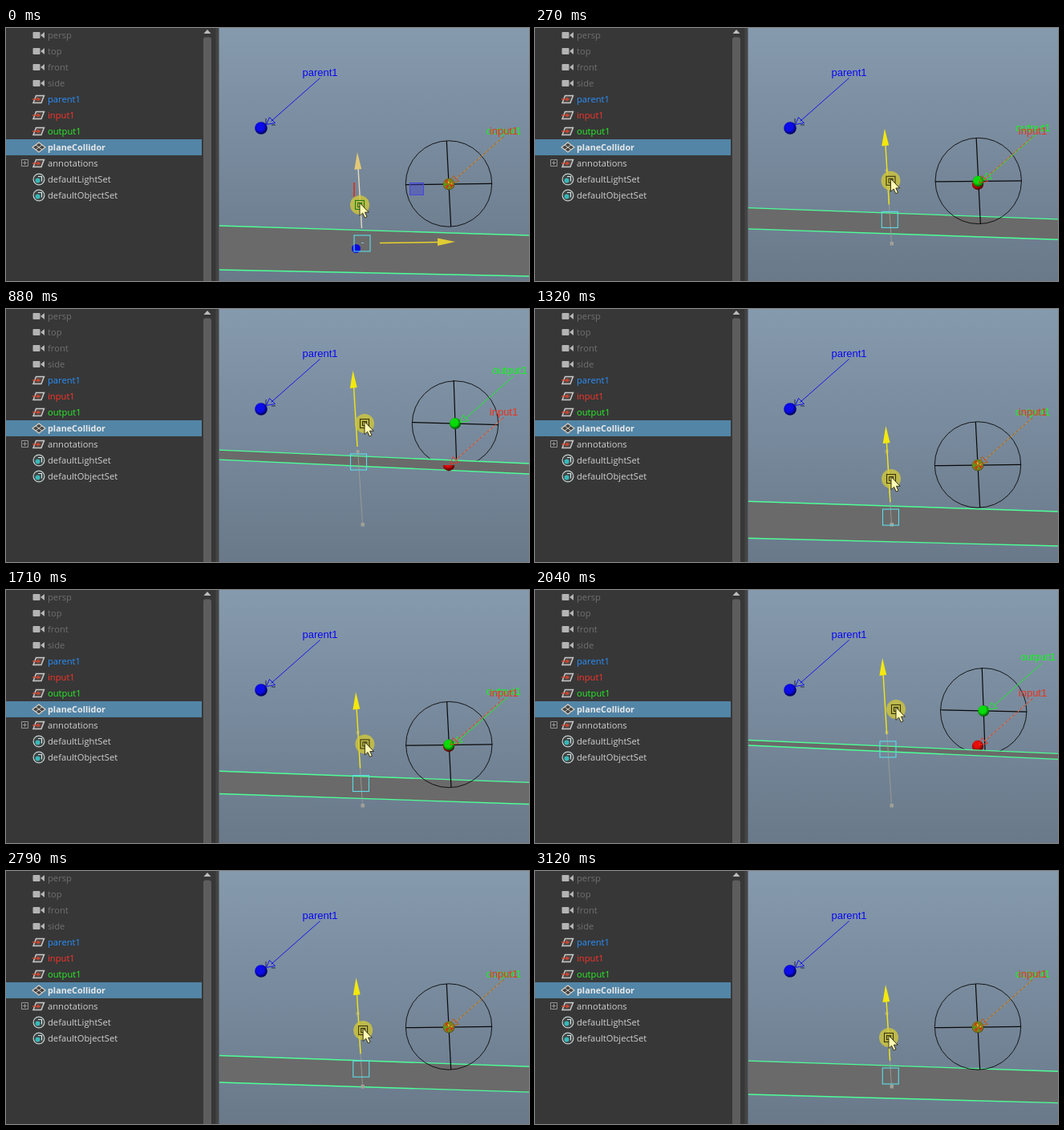
An HTML page that plays this animation: 652x316 px, repeating every 3160 ms.

```html
<!DOCTYPE html>
<html lang="en">
<head>
<meta charset="utf-8">
<title>Plane collider</title>
<style>
html, body { margin: 0; width: 100%; height: 100%; overflow: hidden; background: #373737; }
svg { display: block; }
.row { font: 11.2px "Open Sans", sans-serif; }
.row.selected { font-size: 10.8px; font-weight: 700; }
.tag { font: 13px "Liberation Sans", Arial, sans-serif; text-anchor: middle; }
</style>
</head>
<body>
<svg width="652" height="316" viewBox="0 0 652 316">
  <defs>
    <linearGradient id="sky" x1="0" y1="0" x2="0" y2="1">
      <stop offset="0" stop-color="#869aae"/><stop offset="1" stop-color="#69798a"/>
    </linearGradient>
    <radialGradient id="blue" cx=".42" cy=".4" r=".62">
      <stop offset=".5" stop-color="#0a0aea"/><stop offset="1" stop-color="#000048"/>
    </radialGradient>
    <radialGradient id="red" cx=".42" cy=".35" r=".65">
      <stop offset=".4" stop-color="#e80c0c"/><stop offset="1" stop-color="#4a0000"/>
    </radialGradient>
    <radialGradient id="green" cx=".42" cy=".4" r=".62">
      <stop offset=".5" stop-color="#08dc08"/><stop offset="1" stop-color="#004800"/>
    </radialGradient>
    <clipPath id="under"><rect id="underRect" x="530" width="44" height="40"/></clipPath>
    <clipPath id="view"><rect x="266" width="386" height="316"/></clipPath>
  </defs>
  <rect x="265" width="387" height="316" fill="url(#sky)"/>

  <g id="scene" clip-path="url(#view)">
    <g id="rig" fill="none" stroke="#080808">
      <circle id="ring" r="53.700" stroke-width=".9"/>
      <path id="cross" stroke-width="1.2"/>
      <circle id="inputBall" cx="552" cy="195" r="7.2" fill="url(#red)" stroke="none"/>
    </g>
    <g id="plane">
      <polygon id="face" fill="#6a6a6a"/>
      <path id="edges" fill="none" stroke="#4dff98" stroke-width="1.4"/>
    </g>
    <circle id="inputUnder" cx="552" cy="195" r="7.2" fill="url(#red)" clip-path="url(#under)"/>
    <circle id="outputBall" r="7" fill="url(#green)"/>
    <g id="mixed" transform="translate(552 195)">
      <circle r="6.8" fill="#8e7a18"/>
      <path d="M-5-4L-1-6V-1ZM1 0L6 1L3 5ZM-4 2L0 1L-2 6Z" fill="#c83414"/>
      <path d="M-6-1L-2 0L-5 3ZM1-6L5-3L1-1ZM0 2L3 3L0 6Z" fill="#3ca420"/>
      <path d="M-2-4L1-3L0 0ZM2-2H5L3 1Z" fill="#d8c028"/>
    </g>

    <circle cx="318" cy="125" r="7.8" fill="url(#blue)"/>
    <path d="M324 113V120M331 121H336" stroke="#202850"/>
    <g id="parentNote"></g>
    <g id="outputNote"></g>
    <g id="inputNote"></g>

    <g id="hover">
      <path d="M434 193V211" stroke="#d03c28" stroke-width="2"/>
      <rect x="503.500" y="193.500" width="17" height="15" fill="#3c3cd8" fill-opacity=".4" stroke="#4648dc"/>
      <circle cx="436.500" cy="275.500" r="5.500" fill="#0808dc"/>
      <path d="M466 268.500L540 267.500" stroke="#e6d22c" stroke-width="1.5"/>
      <path d="M538 262.500L560 267L538 272Z" fill="#e2cc34"/>
      <path d="M443 268.500H446" stroke="#7cc8d8"/>
    </g>
    <g id="ghost" stroke="#a0a098" fill="#a0a098">
      <path d="M438.700 178L444.500 269" stroke-opacity=".8"/>
      <rect x="436.500" y="176" width="4" height="4" stroke="none"/>
      <rect x="442.500" y="267" width="4.500" height="4.500" stroke="none"/>
    </g>
    <path id="shaft" fill="none" stroke-width="1.4"/>
    <path id="head"/>
    <rect id="pivot" width="20" height="20" fill="none" stroke="#5edce8" stroke-width="1.1"/>
    <g id="pointer">
      <circle r="12" fill="#d2c838" fill-opacity=".78"/>
      <g id="grip" fill="none" stroke-width="1.1">
        <rect x="-5.500" y="-5.500" width="11" height="11"/><rect x="-2.500" y="-2.500" width="5" height="5"/>
      </g>
      <path transform="translate(0 -1)" d="M0-1.500V14.500L3.600 11.200L6.200 17L9 15.700L6.400 10.200H11.200Z" fill="#fffab4" stroke="#28240c" stroke-width=".9"/>
    </g>
  </g>

  <rect width="246" height="316" fill="#373737"/>
  <rect x="246" width="10.500" height="316" fill="#373737"/>
  <path d="M246.500 7L251 2L255.500 7Z" fill="#bcbcbc"/>
  <rect x="246" y="11.500" width="10" height="320" rx="3" fill="#5d5d5d"/>
  <rect x="256.500" width="5" height="316" fill="#373737"/>
  <rect x="261.500" width="4" height="316" fill="#444"/>
  <g id="outliner"></g>
</svg>
<script>
const LOOP = 3160;
const $ = id => document.getElementById(id);
const set = (id, attrs) => {
  for (const k in attrs) $(id).setAttribute(k, attrs[k]);
};
const show = (id, on) => set(id, { visibility: on ? 'visible' : 'hidden' });

// Sidebar
const icons = {
  camera: '<rect x="33.500" y="-4" width="9" height="8" rx="1" fill="#b4b4b4"/><path d="M43 0L48-4V4Z" fill="#b4b4b4"/>',
  node: '<path d="M37.500-4.500H47.500L44 4.500H34Z" fill="#4c4846" stroke="#c8c8c8" stroke-width="1.500"/>' +
        '<path d="M33 0H40" stroke="#d0452f" stroke-width="1.400"/><path d="M39-2.500L43.500 0L39 2.500Z" fill="#d0452f"/>',
  mesh: '<path d="M41-6L49 0L41 6L33 0Z" fill="#444" stroke="#d8d0c4" stroke-width="1.200"/><path d="M37-3L45 3M45-3L37 3" stroke="#d8d0c4"/>',
  set: '<circle cx="41" r="6.900" fill="#404444" stroke="#c8d0d0" stroke-width="1.200"/>' +
       '<circle cx="39.500" cy="1.500" r="3" fill="#38b8b8"/><path d="M40-3.500H44.500V2.500" fill="none" stroke="#d4e8e8" stroke-width="1.200"/>'
};
const rows = [
  ['persp', 'camera', '#707070'], ['top', 'camera', '#707070'],
  ['front', 'camera', '#707070'], ['side', 'camera', '#707070'],
  ['parent1', 'node', '#2890ff'], ['input1', 'node', '#ff3228'], ['output1', 'node', '#28f028'],
  ['planeCollidor', 'mesh', '#e8e8e8'], ['annotations', 'node', '#d0d0d0'],
  ['defaultLightSet', 'set', '#d0d0d0'], ['defaultObjectSet', 'set', '#d0d0d0']
];
$('outliner').innerHTML = rows.map(([name, icon, color], i) => {
  const selected = icon === 'mesh';
  return `<g transform="translate(0 ${9 + i * 20})">` +
    (selected ? '<rect y="-10" width="244" height="20" fill="#5285a6"/>' : '') +
    (name === 'annotations' ? '<path d="M19.500-4.500H27.500V3.500H19.500ZM21-.5H26M23.500-3V2" fill="none" stroke="#949494"/>' : '') +
    icons[icon] +
    `<text class="row${selected ? ' selected' : ''}" x="52" y="4" fill="${color}">${name}</text></g>`;
}).join('');

// Label with a leader line and an open arrowhead, relative to the arrow tip
function note(id, text, color, dash = '') {
  $(id).innerHTML =
    `<path d="M6-4L67-58" fill="none" stroke="${color}" stroke-width=".9"/>` + dash +
    `<path d="M0 0L4-9L11-2Z" fill="none" stroke="${color}" stroke-width=".9"/>` +
    `<text class="tag" x="67" y="-61" fill="${color}">${text}</text>`;
}
note('parentNote', 'parent1', '#0808f0');
note('outputNote', 'output1', '#10f81c');
note('inputNote', 'input1', '#e8321c',
  '<path d="M8-6L66-57" stroke="#c8986c" stroke-dasharray="3 3"/>');
set('parentNote', { transform: 'translate(324.5 120.5)' });
set('inputNote', { transform: 'translate(553.5 193.5)' });

// Monotone cubic through [time, value] points
function curve(points) {
  const slope = points.slice(1).map((p, i) => (p[1] - points[i][1]) / (p[0] - points[i][0]));
  const tangent = points.map((_, i) => {
    const a = slope[i - 1], b = slope[i];
    if (a === undefined) return b;
    if (b === undefined) return a;
    return a * b <= 0 ? 0 : 2 * a * b / (a + b);
  });
  return t => {
    let i = 0;
    while (i < points.length - 2 && t > points[i + 1][0]) i++;
    const [t0, v0] = points[i], [t1, v1] = points[i + 1], h = t1 - t0;
    const u = Math.min(1, (t - t0) / h), w = 1 - u;
    return v0 * (1 + 2 * u) * w * w + v1 * u * u * (3 - 2 * u) +
      h * u * w * (tangent[i] * w - tangent[i + 1] * u);
  };
}
const height = curve([
  [0, 269], [30, 268], [530, 202], [720, 186.5], [880, 191], [1080, 220], [1320, 260],
  [1420, 266], [1620, 252], [2040, 199], [2160, 194], [2260, 194], [2550, 226], [2760, 246], [3120, 256]
]);
const mouseX = curve([[0, 441], [530, 445.5], [880, 447], [1320, 444], [2040, 450], [2550, 447.5], [3120, 441]]);
const mouseLag = curve([[0, 48], [530, 49], [880, 48], [1320, 48], [2040, 50], [2550, 48.5], [3120, 48]]);

function draw(t) {
  const y = height(t), d = y - 191, k = d / 78, idle = t < 30;

  // Plane edges at the left and right of the view
  const backL = 188 + 0.756 * d, backR = 206 + 0.68 * d;
  const frontL = 176 + 1.514 * d + 0.00236 * d * (d - 35);
  const frontR = 193 + 1.457 * d + 0.001 * d * (d - 35);
  const fromBelow = frontL < backL;
  set('face', { points: `265,${backL} 652,${backR} 652,${frontR} 265,${frontL}` });
  set('edges', { d: `M265 ${backL}L652 ${backR}M265 ${frontL}L652 ${frontR}` });
  const first = $(fromBelow ? 'rig' : 'plane');
  if ($('scene').firstElementChild !== first) $('scene').prepend(first);

  // Output rests on the plane or falls back to the input position
  const outY = Math.min(y - 48, 195), lift = (195 - outY) / 52;
  const outX = 552 + 8 * lift * (1.4 - 0.4 * lift);
  const merged = lift < 0.01;
  const dx = 2.7 - 0.9 * lift, dy = -0.7 + 2.2 * lift;
  set('ring', { cx: outX, cy: outY - 0.5 + lift });
  set('cross', { d: `M${outX - dx} ${outY - 54}L${outX + dx} ${outY + 53}M${outX - 54} ${outY - dy}L${outX + 54} ${outY + dy}` });
  set('outputBall', { cx: outX, cy: outY });
  set('outputNote', { transform: `translate(${outX + (merged ? 1.5 : 6)} ${outY - 1.5})` });
  $('outputNote').lastChild.setAttribute('x', merged ? 67 : 62);
  set('underRect', { y: outY + 52 });
  show('inputUnder', fromBelow);
  show('mixed', merged);

  // Manipulator
  const tipX = 432.5 + 5.5 * k, tipY = y - 114;
  set('shaft', { d: `M${tipX + 1} ${tipY + 20}L${tipX + 5.5} ${y - 19}`, stroke: idle ? '#e4dcc0' : '#f2e612' });
  set('head', { d: `M${tipX} ${tipY}L${tipX - 3.7} ${tipY + 22}L${tipX + 5.2} ${tipY + 21}Z`, fill: idle ? '#e2c878' : '#f4e80c' });
  set('pivot', { x: 429.5 + 4.5 * k, y: y - 10 });
  show('hover', idle);
  show('ghost', !idle);
  set('pointer', { transform: `translate(${mouseX(t)} ${y - mouseLag(t)})` });
  set('grip', { stroke: idle ? '#1c7c14' : '#38340c' });
}

const start = performance.now();
function tick() {
  draw((performance.now() - start) % LOOP);
  requestAnimationFrame(tick);
}
tick();
</script>
</body>
</html>
```
